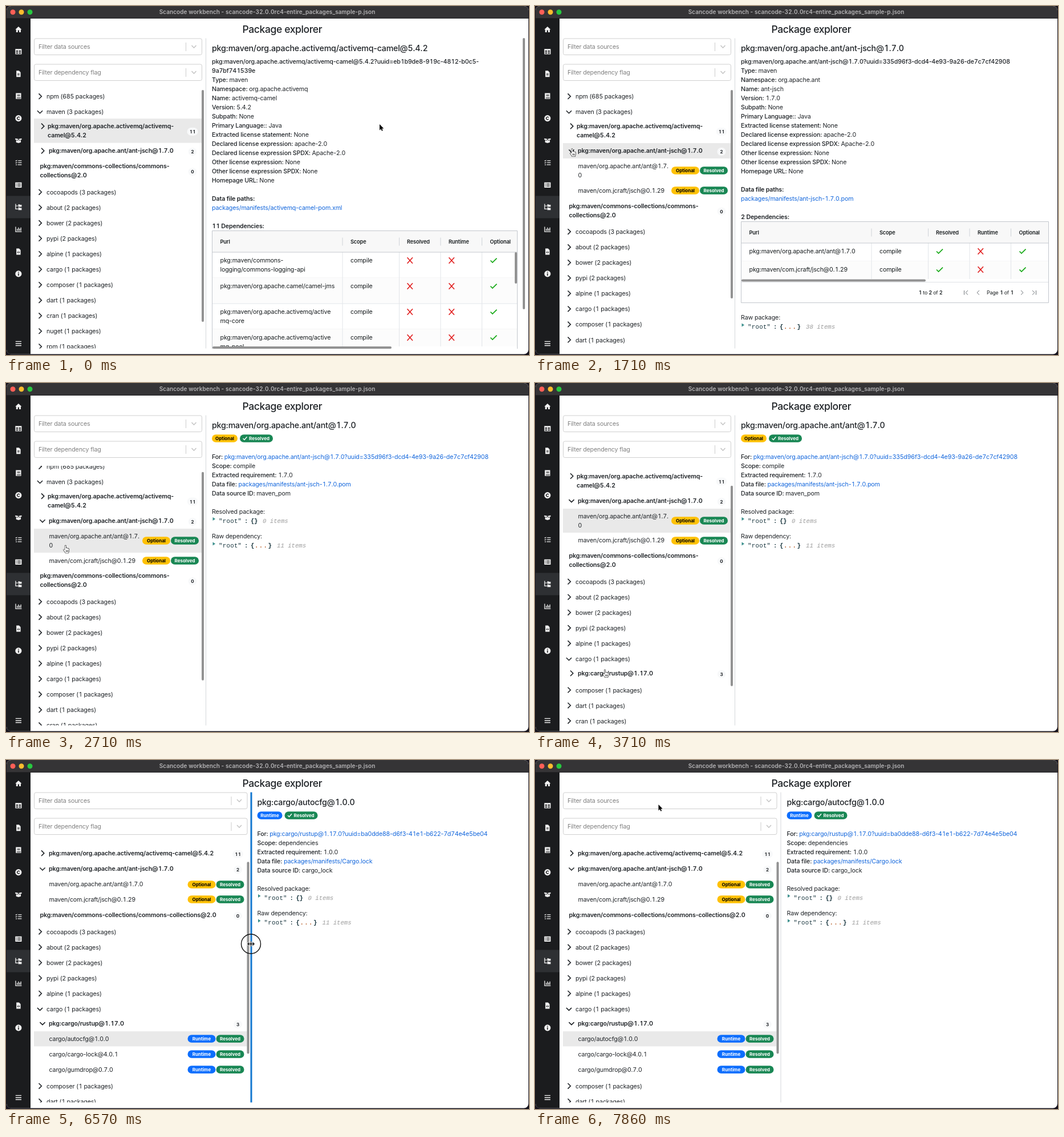
These frames come from a looping animation (917 px wide and 611 px high, 8000 ms). An HTML page with a canvas:

```html
<!DOCTYPE html>
<html lang="en">
<head>
<meta charset="utf-8">
<title>Package explorer</title>
<style>
html, body { margin: 0; width: 100%; height: 100%; overflow: hidden; background: #15121c; }
canvas { display: block; width: 917px; height: 611px; }
</style>
</head>
<body>
<canvas id="stage"></canvas>
<script>
const W = 917, H = 611, LOOP = 8000, FPS = 7;
const canvas = document.getElementById('stage');
const c = canvas.getContext('2d');
const dpr = window.devicePixelRatio || 1;
canvas.width = W * dpr;
canvas.height = H * dpr;

const INK = '#1f2327', LINK = '#1266dc', GREY = '#929292';
const YELLOW = '#ffc107', GREEN = '#198754', BLUE = '#0d6efd';
const SANS = 'Inter, "Open Sans", sans-serif', MONO = '"Liberation Mono", "DejaVu Sans Mono", monospace';

// ---------- drawing helpers ----------
// Digits are set on equal widths, like tabular figures.
function text(s, x, y, { size = 10.67, weight = 400, color = INK, align = 'left', font = SANS, style = '', gap = -0.014 * size } = {}) {
  c.font = `${style} ${weight} ${size}px ${font}`;
  c.letterSpacing = gap + 'px';
  c.fillStyle = color;
  const width = t => c.measureText(t).width, figure = width('0');
  const parts = String(s).split(/(\d)/).filter(Boolean).map(t => {
    const own = width(t);
    return { t, own, w: /\d/.test(t) ? figure : own };
  });
  if (align === 'center') x -= (parts.reduce((sum, p) => sum + p.w, 0) - gap) / 2;
  for (const { t, own, w } of parts) {
    c.fillText(t, x + (w - own) / 2, y + size * 0.355);
    x += w;
  }
  return x;
}
function rect(x, y, w, h, color) { c.fillStyle = color; c.fillRect(x, y, w, h); }
function round(x, y, w, h, r, fill, stroke) {
  c.beginPath();
  c.roundRect(x, y, w, h, r);
  if (fill) { c.fillStyle = fill; c.fill(); }
  if (stroke) { c.strokeStyle = stroke; c.lineWidth = 1; c.stroke(); }
}
function line(color, width, ...pts) {
  c.beginPath();
  for (let i = 0; i < pts.length; i += 2) c.lineTo(pts[i], pts[i + 1]);
  c.strokeStyle = color;
  c.lineWidth = width;
  c.stroke();
}
function disc(x, y, r, color) { c.beginPath(); c.arc(x, y, r, 0, 7); c.fillStyle = color; c.fill(); }
function chevron(x, y, open) {
  if (open) line(INK, 1.6, x - 4.6, y - 2, x, y + 2.5, x + 4.6, y - 2);
  else line(INK, 1.6, x - 2, y - 4.8, x + 2.8, y, x - 2, y + 4.8);
}
function mark(x, y, ok) {
  if (ok) line('#16a916', 1.7, x + 1, y, x + 4.5, y + 3.6, x + 12, y - 3.8);
  else {
    line('#e01b1b', 1.6, x + 0.5, y - 5.2, x + 10, y + 5.2);
    line('#e01b1b', 1.6, x + 10, y - 5.2, x + 0.5, y + 5.2);
  }
}
function pill(s, x, y, w, tick) {
  y = Math.round(y);
  round(x, y - 6.8, w, 13.6, 6.8, { Optional: YELLOW, Runtime: BLUE, Resolved: GREEN }[s]);
  const color = s === 'Optional' ? '#000' : '#fff';
  if (tick) line(color, 1.4, x + 5.5, y, x + 8, y + 2.5, x + 12.5, y - 2.7);
  text(s, x + w / 2 + (tick ? 5 : 0), y, { size: 8, weight: 700, color, align: 'center', gap: 0 });
}
function clip(x, y, w, h, draw) {
  c.save();
  c.beginPath();
  c.rect(x, y, w, h);
  c.clip();
  draw();
  c.restore();
}
const ease = p => { p = Math.min(1, Math.max(0, p)); return p * p * (3 - 2 * p); };

// ---------- window frame and sidebar ----------
const FILE = 'M2 0H7L10 3V12H2Z', DISC = 'M0 6A6 6 0 1 0 12 6A6 6 0 1 0 0 6Z';
const icons = [
  'M6 .6 0 6.2H1.6V11.4H4.8V7.6H7.2V11.4H10.4V6.2H12Z',
  'M0 1H12V11H0ZM1.5 4H5.2V6H1.5ZM6.8 4H10.5V6H6.8ZM1.5 7.5H5.2V9.5H1.5ZM6.8 7.5H10.5V9.5H6.8Z',
  FILE + 'M4 5.5H8V6.5H4ZM4 7.7H8V8.7H4Z',
  'M1 .5H11V11.5H1ZM3.5 3H9V4H3.5ZM3.5 5H9V6H3.5ZM3 8.7H10V10H3Z',
  DISC + 'M8.6 4.2A3.1 3.1 0 1 0 8.6 7.8L7.5 6.9A1.7 1.7 0 1 1 7.5 5.1Z',
  'M0 2 5.6 3 4.2 5.5 0 4.5ZM12 2 6.4 3 7.8 5.5 12 4.5ZM1.5 5.5 4.7 6.3 6 4 7.3 6.3 10.5 5.5V9.5L6 10.8 1.5 9.5Z',
  'M0 2.4 .9 1.6 1.6 2.2 3.2 .8 3.9 1.6 1.6 3.8ZM0 6.2 .9 5.4 1.6 6 3.2 4.6 3.9 5.4 1.6 7.6ZM5.3 1.6H12V2.9H5.3ZM5.3 5.4H12V6.7H5.3ZM4.6 9.2H12V10.5H4.6ZM1 9H2.8V10.7H1Z',
  'M0 1H12V11H0ZM1.8 3H3.2V4.2H1.8ZM4.3 3H10.2V4.2H4.3ZM1.8 5.4H3.2V6.6H1.8ZM4.3 5.4H10.2V6.6H4.3ZM1.8 7.8H3.2V9H1.8ZM4.3 7.8H10.2V9H4.3Z',
  'M0 0H1.4V3H5V4.3H1.4V8.7H5V10H0ZM5.6 .6H8L8.8 1.4H12V5.4H5.6ZM5.6 6.6H8L8.8 7.4H12V11.4H5.6Z',
  'M0 1H1.4V9.6H12V11H0ZM3 5H4.4V8.5H3ZM5.3 2.5H6.7V8.5H5.3ZM7.6 4.5H9V8.5H7.6ZM9.9 2.5H11.3V8.5H9.9Z',
  FILE + 'M5.3 5.3 3.4 7.3 5.3 9.3ZM6.7 5.3 8.6 7.3 6.7 9.3Z',
  DISC + 'M5.2 2.4H6.8V4H5.2ZM5.2 5H6.8V9.6H5.2Z',
  'M.5 1.5H11.5V2.9H.5ZM.5 5.3H11.5V6.7H.5ZM.5 9.1H11.5V10.5H.5Z'
].map(d => new Path2D(d));

function chrome() {
  rect(0, 0, W, H, '#15121c');
  c.save();
  round(1, 0, 915, 609.5, 8);
  c.clip();
  rect(0, 0, W, H, '#fff');
  rect(0, 0, W, 22, '#353436');
  rect(0, 21, W, 1, '#232224');
  rect(0, 22, 43, H, '#1b1c1e');
  rect(0, 332.5, 43, 39, '#2e3033');
  c.restore();
  ['#ff5f57', '#febc2e', '#28c840'].forEach((color, i) => disc(12 + 15 * i, 10.8, 4.5, color));
  text('Scancode workbench - scancode-32.0.0rc4-entire_packages_sample-p.json', 458, 10.5,
    { size: 10, weight: 600, color: '#b4b3b5', align: 'center', gap: 0.06 });
  icons.forEach((icon, i) => {
    c.save();
    c.translate(16.3, (i < 12 ? 41 + 38.9 * i : 591) - 5.6);
    c.scale(0.93, 0.93);
    c.fillStyle = '#f1f1f1';
    c.fill(icon, 'evenodd');
    c.restore();
  });
  text('Package explorer', 484.5, 40.3, { size: 17.5, weight: 500, align: 'center', gap: -0.38 });
}

// ---------- left pane ----------
function filter(label, y, d) {
  round(49.5, y - 14, 294 + d, 28.5, 3, '#fff', '#cfcfcf');
  text(label, 57, y, { color: '#808080' });
  line('#ccc', 1, 315.5 + d, y - 7, 315.5 + d, y + 8);
  line('#c4c4c4', 1.5, 325.5 + d, y - 2, 329.5 + d, y + 2.2, 333.5 + d, y - 2);
}

// `split` is where a name wraps while the pane has grown by less than `fit`.
const dep = (id, flag, split, fit) => ({ id, flag, split, fit });
const tree = [
  ['npm', 685],
  ['maven', 3, [
    { id: 'pkg:maven/org.apache.activemq/activemq-camel@5.4.2', split: 39, fit: 50, n: 11, deps: [] },
    { id: 'pkg:maven/org.apache.ant/ant-jsch@1.7.0', n: 2, opens: 11, deps: [
      dep('maven/org.apache.ant/ant@1.7.0', 'Optional', 29, 8), dep('maven/com.jcraft/jsch@0.1.29', 'Optional')] },
    { id: 'pkg:maven/commons-collections/commons-collections@2.0', split: 38, fit: 56, n: 0 }], 0],
  ['cocoapods', 3], ['about', 2], ['bower', 2], ['pypi', 2], ['alpine', 1],
  ['cargo', 1, [
    { id: 'pkg:cargo/rustup@1.17.0', n: 3, opens: 29, deps:
      ['autocfg@1.0.0', 'cargo-lock@4.0.1', 'gumdrop@0.7.0'].map(s => dep('cargo/' + s, 'Runtime')) }], 24],
  ['composer', 1], ['dart', 1], ['cran', 1], ['nuget', 1], ['rpm', 1]
];

function selected(k) {
  return k < 8 ? tree[1][2][0].id : k < 15 ? tree[1][2][1].id : k < 36 ? 'maven/org.apache.ant/ant@1.7.0' : 'cargo/autocfg@1.0.0';
}

function leftPane(k, d) {
  filter('Filter data sources', 71, d);
  filter('Filter dependency flag', 116, d);
  const scroll = 47.4 * ease((k - 18) / 3), pick = selected(k);
  let y = 145 - scroll;

  // One tree row that may wrap; returns its middle.
  function row(item, x, weight, base) {
    const wraps = item.split && d < item.fit, h = base + (wraps ? 15.7 : 0), mid = y + h / 2 + 0.3;
    if (item.id === pick) rect(49, y + 0.5, 294 + d, h - 0.5, '#e9e9e9');
    if (wraps) {
      text(item.id.slice(0, item.split), x, mid - 8, { weight });
      text(item.id.slice(item.split), x, mid + 8, { weight });
    } else text(item.id, x, mid, { weight });
    y += h;
    return mid;
  }

  clip(44, 145, 310 + d, 454.5, () => {
    for (const [name, n, pkgs, opens] of tree) {
      const open = pkgs && k >= opens;
      chevron(59.5, y + 13.2, open);
      text(`${name} (${n} packages)`, 71, y + 13.5);
      y += 27.05;
      if (!open) continue;
      y -= 2.5;
      for (const p of pkgs) {
        const wraps = p.split && d < p.fit;
        const mid = row(p, !p.deps ? 59.5 : wraps ? 73 : 75, 600, 27.3);
        const shown = k >= p.opens;
        if (p.deps) chevron(64, mid - (wraps ? 8 : 0), shown);
        const bw = p.n > 9 ? 19 : 15;
        round(327 + d - bw / 2, mid - 5.5, bw, 14, 7, '#f8f9fa');
        text(p.n, 327 + d, mid + 1.7, { size: 8, weight: 700, align: 'center', gap: 0 });
        if (!shown) continue;
        for (const q of p.deps) {
          const m = row(q, 75.5, 400, 26.8);
          pill(q.flag, 239 + d, m, 49);
          pill('Resolved', 289 + d, m, 49);
        }
      }
      y += 2.7;
    }
  });
  const thumb = k < 11 ? 406 : k < 24 ? 365 : k < 29 ? 351 : d < 50 ? 316 : 336;
  round(343 + d, 147 + scroll * thumb / 508, 4, thumb, 2, GREY);
}

// ---------- right pane ----------
function field(label, value, x, y, color) {
  const end = text(label + ' ', x, y, { weight: 500 });
  text(value, end, y, { color });
}

function jsonRoot(x, y, n) {
  c.beginPath();
  c.moveTo(x + 1.5, y - 6); c.lineTo(x + 6, y - 3); c.lineTo(x + 1.5, y);
  c.fillStyle = '#3b8f8c';
  c.fill();
  const mono = { font: MONO, gap: 0.33, color: '#17343d' }, bold = { ...mono, weight: 700 };
  text('"root"', x + 12, y, mono);
  text(':', x + 57, y, bold);
  text('{', x + 68, y, bold);
  if (n) text('...', x + 75, y, { ...bold, color: '#b4541a', gap: 1.3 });
  text('}', x + (n ? 98.5 : 74), y, bold);
  text(n + ' items', x + (n ? 114 : 89), y, { font: MONO, style: 'italic', gap: 0, color: '#9c9c9c' });
}

const COLS = [375.5, 604, 703, 776, 848.5], SEPS = [590, 689.5, 762, 834.5];
function table(top, right, bottom, rowH, rows) {
  const body = top + 37, end = Math.min(bottom, body + rows.length * rowH);
  rect(361, top, right - 361, 37, '#f8f8f8');
  ['Purl', 'Scope', 'Resolved', 'Runtime', 'Optional'].forEach((s, i) =>
    text(s, COLS[i], top + 19, { size: 9.2, weight: 600, color: '#181d1f' }));
  for (const x of SEPS) line('#cfd3d8', 1, x, top + 12, x, top + 26);
  clip(361, body, right - 361, bottom - body, () => {
    rows.forEach(([purl, marks], i) => {
      const y = body + i * rowH;
      if (i % 2) rect(361, y, right - 361, rowH, '#fcfcfc');
      line('#e2e5e9', 1, 361, y + rowH + 0.5, right, y + rowH + 0.5);
      purl.split('|').forEach((s, j) => text(s, COLS[0], y + 15 + 16 * j, { color: '#181d1f' }));
      text('compile', COLS[1], y + 15, { color: '#181d1f' });
      marks.forEach((ok, j) => mark(COLS[j + 2], y + 15, ok));
    });
    for (const x of SEPS) line('#e2e5e9', 1, x, body, x, end);
  });
  line('#c3c7cd', 1, 361, body + 0.5, right, body + 0.5);
}

const FIELDS = ['Type', 'Namespace', 'Name', 'Version', 'Subpath', 'Primary Language:', 'Extracted license statement',
  'Declared license expression', 'Declared license expression SPDX', 'Other license expression',
  'Other license expression SPDX', 'Homepage URL'];

function heading(s, x) { text(s, x, 73.5, { size: 14.2, weight: 500 }); }

function packageView(title, uid, values, path, count) {
  heading(title, 361);
  let y = 97;
  for (const s of uid) { text(s, 361, y, { weight: 500 }); y += 16; }
  FIELDS.forEach((f, i) => { field(f + ':', values[i] || 'None', 361, y); y += 16; });
  text('Data file paths:', 361, y += 16, { weight: 600 });
  text(path, 361, y += 16, { color: LINK });
  text(count + ' Dependencies:', 361, y + 32, { weight: 600 });
}

function camelView() {
  packageView('pkg:maven/org.apache.activemq/activemq-camel@5.4.2',
    ['pkg:maven/org.apache.activemq/activemq-camel@5.4.2?uuid=eb1b9de8-919c-4812-b0c5-', '9a7bf741539e'],
    ['maven', 'org.apache.activemq', 'activemq-camel', '5.4.2', '', 'Java', '', 'apache-2.0', 'Apache-2.0'],
    'packages/manifests/activemq-camel-pom.xml', 11);
  const no = [false, false, true];
  table(393.5, 896, 599, 45, [
    ['pkg:maven/commons-|logging/commons-logging-api', no], ['pkg:maven/org.apache.camel/camel-jms', no],
    ['pkg:maven/org.apache.activemq/active|mq-core', no], ['pkg:maven/org.apache.activemq/active|mq-pool', no]]);
  line('#c3c7cd', 1, 361.5, 600, 361.5, 393.5, 896.5, 393.5, 896.5, 600);
  rect(362, 596, 534, 4, '#fff');
  round(362, 596, 314, 4, 2, GREY);
  round(892, 431, 4, 55, 2, GREY);
  round(906, 56, 4, 475, 2, GREY);
}

function jschView() {
  packageView('pkg:maven/org.apache.ant/ant-jsch@1.7.0',
    ['pkg:maven/org.apache.ant/ant-jsch@1.7.0?uuid=335d96f3-dcd4-4e93-9a26-de7c7cf42908'],
    ['maven', 'org.apache.ant', 'ant-jsch', '1.7.0', '', 'Java', '', 'apache-2.0', 'Apache-2.0'],
    'packages/manifests/ant-jsch-1.7.0.pom', 2);
  const marks = [true, false, true];
  table(377.5, 900, 478, 32, [['pkg:maven/org.apache.ant/ant@1.7.0', marks], ['pkg:maven/com.jcraft/jsch@0.1.29', marks]]);
  round(361.5, 377.5, 539, 142, 0, null, '#c3c7cd');
  round(362, 478.5, 323, 4, 2, GREY);
  line('#dfe2e6', 1, 362, 483.5, 900, 483.5);
  const small = { size: 8.8, color: '#181d1f' };
  const mixed = (s, x) => s.split(' ').forEach(w =>
    x = text(w + ' ', x, 502, { ...small, weight: /\d/.test(w) ? 600 : 400 }));
  mixed('1 to 2 of 2', 672.5);
  mixed('Page 1 of 1', 792);
  const arrow = (x, dir) => line('#70757a', 1, x - 2 * dir, 498, x + 2 * dir, 501.8, x - 2 * dir, 505.6);
  arrow(757, -1); arrow(777, -1); arrow(854, 1); arrow(874, 1);
  line('#70757a', 1, 752.5, 498, 752.5, 505.6);
  line('#70757a', 1, 878.5, 498, 878.5, 505.6);
  text('Raw package:', 361, 545.5);
  jsonRoot(361, 561.5, 38);
}

function depView(x, title, flag, parent, values) {
  heading(title, x);
  const w = flag === 'Optional' ? 45 : 44;
  pill(flag, x, 97.3, w);
  pill('Resolved', x + w + 4, 97.3, 58, true);
  field('For:', parent, x, 129, LINK);
  ['Scope', 'Extracted requirement', 'Data file', 'Data source ID'].forEach((f, i) =>
    field(f + ':', values[i], x, 145 + 16 * i, i === 2 ? LINK : INK));
  text('Resolved package:', x, 225);
  jsonRoot(x, 241, 0);
  text('Raw dependency:', x, 268.5);
  jsonRoot(x, 284.5, 11);
}

function rightPane(k, d) {
  const x = 361 + d;
  if (k < 8) camelView();
  else if (k < 15) jschView();
  else if (k < 36) depView(x, 'pkg:maven/org.apache.ant/ant@1.7.0', 'Optional',
    'pkg:maven/org.apache.ant/ant-jsch@1.7.0?uuid=335d96f3-dcd4-4e93-9a26-de7c7cf42908',
    ['compile', '1.7.0', 'packages/manifests/ant-jsch-1.7.0.pom', 'maven_pom']);
  else depView(x, 'pkg:cargo/autocfg@1.0.0', 'Runtime',
    'pkg:cargo/rustup@1.17.0?uuid=ba0dde88-d6f3-41e1-b622-7d74e4e5be04',
    ['dependencies', '1.0.0', 'packages/manifests/Cargo.lock', 'cargo_lock']);
}

// ---------- pointer ----------
const ARROW = new Path2D('M0 0V10.4L2.4 8.2 4 11.8 5.7 11 4.1 7.5H7.3Z');
const HAND = new Path2D('M2.6 .9C2.6-.2 4.4-.2 4.4 .9V5C5 4.4 6 4.6 6.2 5.3 6.8 4.8 7.8 5 8 5.8 8.7 5.4 9.6 5.8 9.6 6.8V9.5C9.6 11 8.8 12 8.6 13.5H3.6C3.3 12 1.2 10 .3 8.3-.2 7.2 1 6.6 1.8 7.4L2.6 8.2Z');
// step, x, y
const path = [[0, 655, 207], [5, 145, 250], [6, 145, 250], [8, 74.5, 249], [10, 64, 249], [12, 65, 250], [15, 96, 272],
  [17, 103.5, 268.5], [21, 105, 300], [24, 62, 479], [26, 122.5, 502], [29, 64, 503], [31, 66, 504], [35, 138, 532],
  [38, 140, 538], [43, 350, 322], [46, 429.5, 322], [48, 429.5, 322], [49, 430.5, 322], [54, 221, 83], [55, 216.5, 78]];

function pointerAt(k) {
  const i = path.findIndex(p => p[0] >= k);
  if (i < 1) return path[0].slice(1);
  const a = path[i - 1], b = path[i], p = ease((k - a[0]) / (b[0] - a[0]));
  return [a[1] + (b[1] - a[1]) * p, a[2] + (b[2] - a[2]) * p];
}

function pointer(k, x, y, resize) {
  c.save();
  c.translate(x, y);
  if (resize) {
    if (k > 43) {
      c.beginPath();
      c.arc(0, 0, 17, 0, 7);
      c.strokeStyle = '#111';
      c.lineWidth = 1.4;
      c.stroke();
    }
    const both = (color, w) => {
      line(color, w, -5, 0, 5, 0);
      line(color, w, 0, -4.5, 0, 4.5);
      line(color, w, -3, -2.6, -5.6, 0, -3, 2.6);
      line(color, w, 3, -2.6, 5.6, 0, 3, 2.6);
    };
    both('#fff', 3);
    both('#000', 1.3);
  } else {
    const hand = x < 344 && y > 145;
    if (hand) c.translate(-3.5, 0);
    const shape = hand ? HAND : ARROW;
    c.lineJoin = 'round';
    c.strokeStyle = hand ? '#000' : '#fff';
    c.lineWidth = hand ? 1.1 : 1.6;
    c.fillStyle = hand ? '#fff' : '#000';
    c.stroke(shape);
    c.fill(shape);
    if (hand) for (const fx of [4.6, 6.2, 7.8]) line('#000', 0.7, fx, 8.5, fx, 11.5);
  }
  c.restore();
}

function draw(k) {
  const [x, y] = pointerAt(k), resize = k >= 43 && k < 50;
  const d = k < 44 ? 0 : k >= 49 ? 80.5 : Math.min(79.5, x - 350);
  c.setTransform(dpr, 0, 0, dpr, 0, 0);
  chrome();
  leftPane(k, d);
  if (resize) rect(349 + d, 56.5, 3, 543, '#1277cf');
  else rect(350 + d, 56.5, 1, 543, '#d5d8db');
  rightPane(k, d);
  pointer(k, x, y, resize);
}

// The screen updates in steps, seven a second.
function tick() {
  draw(Math.floor((performance.now() % LOOP + 5) * FPS / 1000) % (LOOP * FPS / 1000));
  requestAnimationFrame(tick);
}
tick();
</script>
</body>
</html>
```
